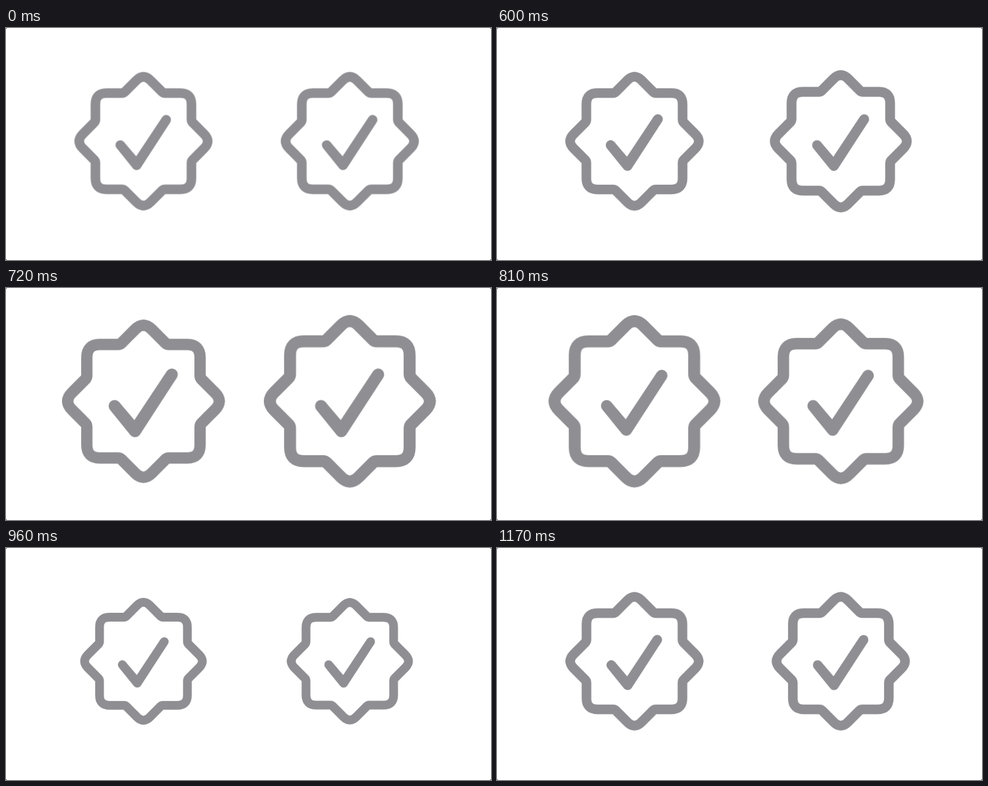
These frames come from a looping animation (788 px wide and 376 px high, 1410 ms). An HTML page without scripts:

```html
<!DOCTYPE html>
<html lang="en">
<head>
<meta charset="utf-8">
<title>Seal bounce</title>
<style>
  html, body { margin: 0; width: 100%; height: 100%; overflow: hidden; background: #000; }
  svg { display: block; width: 788px; height: 376px; }
  .ink {
    fill: none;
    stroke: #8e8e93;
    stroke-width: 15.6;
    stroke-linecap: round;
    stroke-linejoin: round;
  }
  .bounce { animation: bounce 1410ms infinite; }
  .late { animation-delay: 45ms; }

  /* rest, swell, dip, settle */
  @keyframes bounce {
    0%, 38.298% { transform: scale(1); animation-timing-function: cubic-bezier(.62, 0, .58, 1); }
    52.482% { transform: scale(1.25); animation-timing-function: cubic-bezier(.6, 0, .7, 1); }
    66.241% { transform: scale(.904); animation-timing-function: cubic-bezier(.3, 0, .3, 1); }
    80%, 100% { transform: scale(1); }
  }
</style>
</head>
<body>
<svg viewBox="0 0 788 376">
  <defs>
    <path id="quarter" d="M0-104.4Q5.8-104.4 11.6-98.6L30.2-80Q32.2-78 35.2-78H60Q78-78 78-60V-35.2Q78-32.2 80-30.2L98.6-11.6Q104.4-5.8 104.4 0"/>
    <g id="seal">
      <use href="#quarter"/>
      <use href="#quarter" transform="rotate(90)"/>
      <use href="#quarter" transform="rotate(180)"/>
      <use href="#quarter" transform="rotate(270)"/>
    </g>
    <!-- thin triangle: the legs thicken towards the bend -->
    <path id="check" d="M-37.6 6.2L-11 39L37-34.8L-11 37.4Z"/>
  </defs>

  <rect width="788" height="376" rx="2" fill="#fff"/>

  <!-- layers bounce one after the other -->
  <g class="ink" transform="translate(223.3 183.5)">
    <g class="bounce late"><use href="#seal"/></g>
    <g class="bounce"><use href="#check"/></g>
  </g>

  <!-- whole symbol bounces at once -->
  <g class="ink" transform="translate(558.6 183.5)">
    <g class="bounce"><use href="#seal"/><use href="#check"/></g>
  </g>
</svg>
</body>
</html>
```
